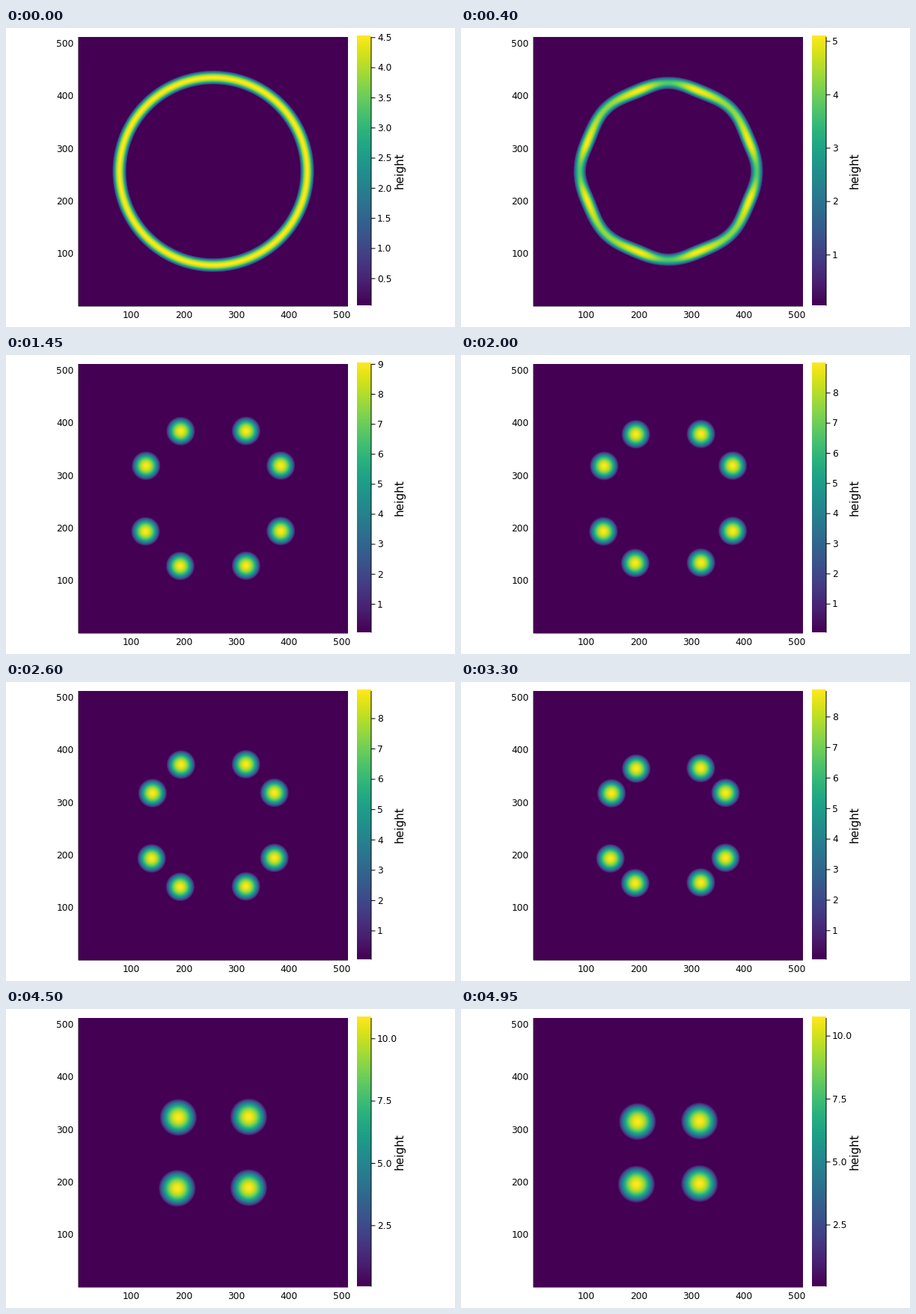
A matplotlib script for the animation above (5000 ms loop, 600 by 400 pixels).

```python
import numpy as np
import matplotlib.pyplot as plt
from matplotlib.animation import FuncAnimation

W, H, DPI = 600, 400, 100
FRAMES, INTERVAL = 100, 50
PX = 72 / DPI  # points per pixel
FLOOR = 0.05
LEFT, TOP, SIZE = 97, 12, 360
CX, CY = 277, 191.7
BAR_LEFT, BAR_RIGHT, BAR_TOP, BAR_BOTTOM = 469, 488, 11, 371.5
SPLIT = 20  # the ring has become separate drops
MEET = 72   # neighbouring drops start to merge

grid = np.arange(SIZE) + 0.5
X, Y = np.meshgrid(LEFT + grid - CX, TOP + grid - CY)
RADIUS = np.hypot(X, Y)
angle = np.degrees(np.arctan2(abs(Y), abs(X)))
FOLDED = np.minimum(angle, 90 - angle)


def ease(t, start, end):
    u = np.clip((t - start) / (end - start), 0, 1)
    return u * u * (3 - 2 * u)


def peak(t):
    """Greatest height: rises at break-up and merging, sinks slowly between."""
    merged = ease(t, 74, 77)
    sink = 0.0043 * max(0, t - 22) * (1 + 2 * merged)
    return 4.51 + 4.53 * ease(t, 4, 22) + 2.67 * merged - sink


def dip(u, depth):
    """Loss of crest height towards a neck: a soft wave that turns parabolic."""
    mix = np.clip(depth - 0.5, 0, 1)
    return depth * ((1 - mix) * (1 - np.cos(np.pi * u)) / 2 + mix * u ** 2)


def ring(t):
    """Shrinking ring whose ripple grows exponentially until it breaks up."""
    growth = np.exp(t / 4) - 1
    crest = 18 + 7.1 * ease(t, 4, SPLIT)
    loss = np.where(FOLDED < crest,
                    dip((crest - FOLDED) / crest, 0.04 * growth),
                    dip((FOLDED - crest) / (45 - crest), 0.025 * growth))
    bulge = 1.8 * np.sin(np.pi * t / SPLIT) * np.cos(8 * np.radians(FOLDED))
    middle = 125.5 - 1.12 * t + bulge
    spread = 20 + 22 * ease(t, 8, SPLIT)
    return peak(t) * (1 - loss) - (RADIUS - middle) ** 2 / spread


def cap(x, y, r, height):
    return height * (1 - ((X - x) ** 2 + (Y - y) ** 2) / r ** 2)


def drops(t):
    """One pair of drops in each quadrant, drifting inwards and merging."""
    age, merged = t - SPLIT, ease(t, MEET, MEET + 7)
    centre = 68.7 - 0.187 * age - 0.43 * max(0, t - MEET + 1)
    gap = (24.8 - 0.18 * age) * (1 - ease(t, MEET, MEET + 8))
    r, height = 19.5 + 5.5 * merged, peak(t)
    blend = 0.05 + 2.4 * merged * (1 - merged)
    film = np.full_like(X, FLOOR)
    for sx in (-1, 1):
        for sy in (-1, 1):
            # the left side drifts a little downwards to the left
            c = centre + (0.75 * sy if sx < 0 else -0.1) * min(1, t / 66)
            a = cap(sx * (c + gap), sy * (c - gap), r, height)
            b = cap(sx * (c - gap), sy * (c + gap), r, height)
            film = np.maximum(film, blend * np.logaddexp(a / blend, b / blend))
    return film


def tick_step(top):
    if top < 4.75:
        return 0.5
    return 1 if top < 9.15 else 2.5


fig = plt.figure(figsize=(W / DPI, H / DPI), dpi=DPI, facecolor="white")
ax = fig.add_axes([0, 0, 1, 1])
ax.axis("off")

heat = ax.imshow(np.zeros_like(X), cmap="viridis", interpolation="nearest",
                 extent=(LEFT, LEFT + SIZE, TOP + SIZE, TOP),
                 aspect="auto", zorder=2)
ax.imshow(np.linspace(1, 0, 256)[:, None], cmap="viridis", aspect="auto",
          extent=(BAR_LEFT, BAR_RIGHT, BAR_BOTTOM, BAR_TOP))
ax.set(xlim=(0, W), ylim=(H, 0))


def label(x, y, text, ha, size=12.3, **kw):
    return ax.text(x, y, text, ha=ha, fontsize=size * PX,
                   family="DejaVu Sans", color="black", **kw)


def line(xs, ys, zorder=3):
    return ax.plot(xs, ys, color="black", lw=PX, solid_capstyle="butt",
                   snap=False, zorder=zorder)[0]


for n in range(100, 501, 100):
    offset = (n - 0.5) * SIZE / 512
    label(LEFT + offset + 0.5, 387.5, str(n), "center", va="baseline")
    label(90.5, TOP + SIZE - offset + 4.3, str(n), "right", va="baseline")

# The frame lies under the heat map, so only its outer half shows
line([LEFT, LEFT, LEFT + SIZE], [TOP, TOP + SIZE, TOP + SIZE], zorder=1)
line([BAR_RIGHT, BAR_RIGHT], [TOP, BAR_BOTTOM])
label(526, 191, "height", "center", 15.3, va="center", rotation=90)

ticks = [(line([BAR_RIGHT, 493.5], [0, 0]),
          label(496, 0, "", "left", va="baseline")) for _ in range(9)]


def update(t):
    film = ring(t) if t < SPLIT else drops(t)
    top = peak(t)
    heat.set_data(np.maximum(film, FLOOR))
    heat.set_clim(FLOOR, top)
    step = tick_step(top)
    for i, (mark, text) in enumerate(ticks, 1):
        value = i * step
        y = BAR_BOTTOM - (BAR_BOTTOM - TOP) * (value - FLOOR) / (top - FLOOR)
        mark.set_ydata([y, y])
        text.set_y(y + 4.3)
        text.set_text(str(value))
        mark.set_visible(value <= top)
        text.set_visible(value <= top)
    return []


anim = FuncAnimation(fig, update, frames=FRAMES, interval=INTERVAL,
                     repeat=True, repeat_delay=0, init_func=lambda: update(0))
plt.show()
```
